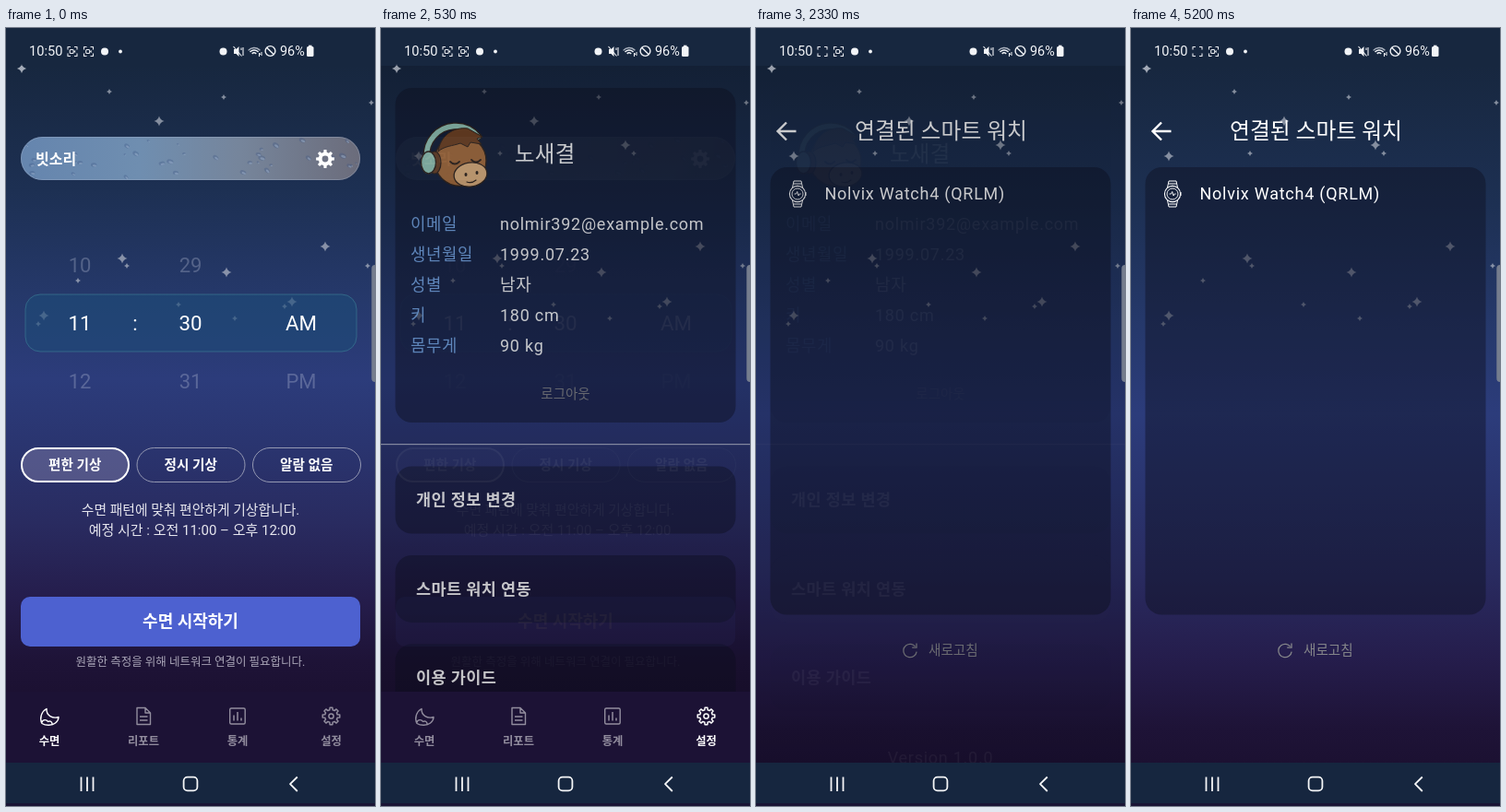
Recreate the animation shown at these times as an HTML page with a canvas. Size 400 by 844 pixels, loop 5540 ms.

```html
<!DOCTYPE html>
<html lang="ko">
<head>
<meta charset="utf-8">
<title>수면</title>
<style>
html, body { margin: 0; width: 100%; height: 100%; overflow: hidden; background: #000; }
canvas { display: block; width: 100vw; height: 100vh; }
</style>
</head>
<body>
<canvas id="stage"></canvas>
<script>
const W = 400, H = 844, LOOP = 5540;
const TOP = 41, BAR = 720, NAV = 797;
const HOME_OUT = 190, TAP = 2000, WATCH_IN = 1975, FADE = 700;
const FONT = 'Roboto, "Noto Sans CJK KR", "Noto Sans CJK JP", sans-serif';
const CARD = 'rgba(15,16,34,.46)';
const scale = window.devicePixelRatio || 1;

const stage = document.getElementById('stage');
stage.width = W * scale;
stage.height = H * scale;
const main = stage.getContext('2d');
main.scale(scale, scale);
let c = main;

// ---------- drawing helpers ----------
function text(s, x, y, size, color = '#fff', { weight = 400, align = 'left', gap = 0 } = {}) {
  c.font = `${weight} ${size}px ${FONT}`;
  c.textAlign = align;
  c.letterSpacing = gap + 'px';
  c.fillStyle = color;
  c.fillText(s, x, y + size * 0.36);
}
const centered = (s, x, y, size, color, weight) => text(s, x, y, size, color, { weight, align: 'center' });

function box(x, y, w, h, r, fill, stroke, line = 1) {
  c.beginPath();
  c.roundRect(x, y, w, h, r);
  paint(fill, stroke, line);
}
const card = (y, h) => box(15.5, y, 369, h, 18, CARD);
function oval(x, y, rx, ry, fill, stroke, line = 1, turn = 0) {
  c.beginPath();
  c.ellipse(x, y, rx, ry, turn, 0, 7);
  paint(fill, stroke, line);
}
function shape(d, fill, stroke, line = 1) {
  const p = new Path2D(d);
  if (fill) { c.fillStyle = fill; c.fill(p); }
  if (stroke) { c.strokeStyle = stroke; c.lineWidth = line; c.stroke(p); }
}
function paint(fill, stroke, line) {
  if (fill) { c.fillStyle = fill; c.fill(); }
  if (stroke) { c.strokeStyle = stroke; c.lineWidth = line; c.stroke(); }
}
function gradient(x0, y0, x1, y1, stops) {
  const g = c.createLinearGradient(x0, y0, x1, y1);
  stops.forEach(([at, color]) => g.addColorStop(at, color));
  return g;
}
function gearPath(x, y, r, teeth) {
  const step = Math.PI * 2 / teeth;
  c.beginPath();
  for (let i = 0; i < teeth; i++) {
    const a = i * step - Math.PI / 2;
    [[-0.3, 0.74], [-0.19, 1], [0.19, 1], [0.3, 0.74]].forEach(([k, m]) =>
      c.lineTo(x + Math.cos(a + k * step) * r * m, y + Math.sin(a + k * step) * r * m));
  }
  c.closePath();
}
function random(seed) {
  return () => (seed = (seed * 16807) % 2147483647) / 2147483647;
}

// ---------- shared backdrop ----------
const STARS = [
  [17, 44, 5], [112, 69, 3], [236, 75, 3], [166, 101, 5.5], [396, 81, 3], [41, 139, 5.5],
  [129, 136, 3], [265, 127, 5.5], [274, 136, 3], [126, 250, 5.5], [131, 258, 3], [346, 237, 5.5],
  [239, 265, 5.5], [78, 274, 3], [187, 300, 3], [310, 297, 5.5], [302, 302, 3], [41, 312, 5.5],
  [35, 321, 3], [248, 315, 3], [392, 258, 3]
];
// the gradient fills the space above the tab bar, or above the system bar
function backdrop(bottom) {
  c.fillStyle = gradient(0, TOP, 0, bottom, [
    [0, '#17273f'], [0.2, '#1d3053'], [0.38, '#26396c'], [0.5, '#2c3c7b'],
    [0.6, '#2a3570'], [0.73, '#292b60'], [0.85, '#251d4c'], [0.95, '#1e1337'], [1, '#1c1132']
  ]);
  c.fillRect(0, 0, W, bottom);
  c.fillStyle = 'rgba(190,194,205,.66)';
  STARS.forEach(([x, y, r]) => {
    c.beginPath();
    c.moveTo(x, y - r);
    [[1, 0], [0, 1], [-1, 0], [0, -1]].forEach(([i, j], n, all) => {
      const [pi, pj] = all[(n + 3) % 4], k = r * 0.2;
      c.quadraticCurveTo(x + (i + pi) * k, y + (j + pj) * k, x + i * r, y + j * r);
    });
    c.fill();
  });
}

// ---------- screens ----------
function rainPill() {
  c.save();
  c.beginPath();
  c.roundRect(16, 118, 368, 47, 23.5);
  c.clip();
  c.fillStyle = gradient(16, 0, 384, 0, [[0, '#6585ae'], [0.35, '#6f8eb0'], [0.65, '#76859b'], [1, '#6b6c7b']]);
  c.fillRect(16, 118, 368, 47);
  const rnd = random(77);
  for (let i = 0; i < 40; i++) {
    const x = 20 + rnd() * 360, y = 121 + rnd() * 42, r = 0.8 + rnd() * 2, turn = rnd() - 0.2;
    oval(x, y, r * 1.5, r, 'rgba(60,85,130,.32)', null, 1, turn);
    oval(x + 0.8, y + 0.9, r, r * 0.5, 'rgba(175,195,220,.4)', null, 1, turn);
  }
  c.restore();
  box(16.5, 118.5, 367, 46, 23, null, 'rgba(160,175,200,.4)');
  text('빗소리', 32, 142, 16, '#fff', { weight: 700 });
  gearPath(346, 142, 10, 8);
  c.moveTo(349.4, 142);
  c.arc(346, 142, 3.4, 0, 7);
  c.fillStyle = '#fff';
  c.fill('evenodd');
}

function home() {
  backdrop(BAR);
  rainPill();

  box(21, 289, 359, 62, 16, 'rgba(30,75,120,.62)', 'rgba(60,125,150,.65)');
  const dim = 'rgba(200,205,225,.3)';
  [['10', '11', '12', 80], ['29', '30', '31', 200], ['', 'AM', 'PM', 320]].forEach(([a, b, d, x]) => {
    centered(a, x, 257, 22, dim);
    centered(b, x, 320, 22.3, '#fff');
    centered(d, x, 383, 22, dim);
  });
  centered(':', 140, 320, 22.3, '#fff');

  ['편한 기상', '정시 기상', '알람 없음'].forEach((s, i) => {
    const x = 16 + i * 125.5;
    if (i) box(x + 0.5, 455.5, 117, 37, 18.5, null, '#9498b2');
    else box(x + 1, 456, 116, 36, 18, 'rgba(125,122,165,.5)', '#fff', 2);
    centered(s, x + 58.7, 474, 14.6, '#fff', 600);
  });

  centered('수면 패턴에 맞춰 편안하게 기상합니다.', 200, 523, 14.8, '#e6e6ee');
  centered('예정 시간 : 오전 11:00 – 오후 12:00', 202, 545, 15, '#e6e6ee');

  box(16, 617, 368, 54, 10, '#4d61d0');
  centered('수면 시작하기', 200, 644, 18, '#fff', 600);
  centered('원활한 측정을 위해 네트워크 연결이 필요합니다.', 200, 687, 12.5, '#aaa6b8');
}

function avatar() {
  const ink = '#33251c', teal = '#9bcfbd';
  c.lineCap = 'round';
  [[8, ink], [5.5, teal]].forEach(([w, color]) => {
    c.beginPath();
    c.arc(81, 138, 31.5, Math.PI * 0.98, Math.PI * 1.78);
    paint(null, color, w);
  });
  oval(86, 144, 28, 27.5, '#ad6f3c', ink, 1.4);
  shape('M62 134C64 117 78 107 94 109L110 118L104 120L109 126L97 124L94 129L86 125C78 128 68 128 62 134Z', '#764421', ink, 1);
  oval(97, 159, 18, 13, '#e8b780', ink, 1.3, -0.15);
  oval(92, 159, 1.5, 2, ink);
  oval(104, 157, 1.5, 2, ink);
  shape('M75 145q5 5 10 0M98 143q5 5 10 0', null, ink, 1.8);
  shape('M93 167q5 2 10 -2', null, ink, 1.2);
  oval(58, 146, 7, 12, '#704426', ink, 1.2);
  oval(51.5, 146, 8, 12, teal, ink, 1.4);
  c.lineCap = 'butt';
}

function settings(bottom) {
  backdrop(bottom);
  card(65, 363);
  avatar();
  text('노새결', 145, 137, 23.4, '#fff', { gap: 0.3 });
  [['이메일', 'nolmir392@example.com'], ['생년월일', '1999.07.23'], ['성별', '남자'],
   ['키', '180 cm'], ['몸무게', '90 kg']].forEach(([label, value], i) => {
    text(label, 32, 213 + i * 33, 17.8, '#78aaea', { gap: 0.6 });
    text(value, 129, 213 + i * 33, 18, '#fff', { gap: 0.75 });
  });
  centered('로그아웃', 200, 397, 14.5, '#838487');

  c.fillStyle = '#aab0c6';
  c.fillRect(0, 451, W, 1.2);

  ['개인 정보 변경', '스마트 워치 연동', '이용 가이드'].forEach((s, i) => {
    const y = 475.5 + i * 96.4;
    card(y, 73);
    text(s, 38, y + 36.5, 17.5, '#fff', { weight: 600, gap: 0.4 });
  });
  text('Version 1.0.0', 200, 792, 18, '#fff', { align: 'center', gap: 0.75 });
}

function watch() {
  backdrop(NAV);
  shape('M43.5 112H24M33 102.5L23.5 112L33 121.5', null, '#fff', 2.4);
  centered('연결된 스마트 워치', 200.5, 111, 23.8, '#fff', 500);
  card(151, 485.5);

  oval(45, 180, 8.6, 8.6, null, '#fff', 1.1);
  oval(45, 180, 6, 6, null, '#fff', 0.9);
  shape('M39.5 173L41 166H49L50.5 173M39.5 187L41 194H49L50.5 187M41 169H49M41 191H49M54 178v4', null, '#fff', 1);
  shape('M41.5 180h2l1.2 -2.5l1.4 4.5l1 -2h1.5', null, '#fff', 0.9);
  text('Nolvix Watch4 (QRLM)', 74.5, 180, 18, '#fff', { gap: 0.75 });

  const gray = '#85868a';
  c.beginPath();
  c.arc(167, 675.5, 7.2, 0.15, Math.PI * 1.78);
  paint(null, gray, 1.3);
  shape('M174 667.5V672.2H169.2', null, gray, 1.3);
  text('새로고침', 187, 675, 14.6, gray, { weight: 500 });
}

function layer(draw, ...args) {
  const cv = document.createElement('canvas');
  cv.width = W * scale;
  cv.height = H * scale;
  c = cv.getContext('2d');
  c.scale(scale, scale);
  draw(...args);
  c = main;
  return cv;
}

// ---------- system chrome ----------
function brackets(x, y, dot) {
  shape(`M${x - 5} ${y - 2}v-3h3M${x + 2} ${y - 5}h3v3M${x + 5} ${y + 2}v3h-3M${x - 2} ${y + 5}h-3v-3`, null, '#e8eaee', 1.1);
  if (dot <= 0) return;
  c.globalAlpha = dot;
  box(x - 2.8, y - 2, 4, 4, 1, null, '#e8eaee', 1.1);
  shape(`M${x + 1.2} ${y}l2 -1.6v3.2z`, '#e8eaee');
  c.globalAlpha = 1;
}

function statusBar(dot) {
  c.fillStyle = '#17273f';
  c.fillRect(0, 0, W, TOP);
  // the topmost star reaches under the status bar edge
  shape('M17 39Q17.8 43 22 44Q17.8 45 17 49Q16.2 45 12 44Q16.2 43 17 39Z', 'rgba(190,194,205,.55)');
  text('10:50', 25, 25, 14.6, '#f2f4f7');
  brackets(72, 25.5, dot);
  brackets(89.5, 25.5, 1);
  oval(107, 25.5, 4, 4, '#f2f4f7');
  oval(124, 25.5, 1.9, 1.9, '#f2f4f7');

  oval(235.5, 25.5, 4, 4, '#f2f4f7');
  shape('M247 23h2.5l3 -3v11l-3 -3h-2.5z', '#f2f4f7');
  shape('M246.5 20l9 10.5M255 21.5v2.5M257 21v9', null, '#f2f4f7', 1.1);
  [3, 6, 8.5].forEach(r => {
    c.beginPath();
    c.arc(269, 30, r, -Math.PI * 0.77, -Math.PI * 0.23);
    paint(null, r > 7 ? '#aab1bd' : '#f2f4f7', 1.4);
  });
  shape('M274.5 31v-4l1.5 2M277 26v4', null, '#f2f4f7', 1);
  oval(286.5, 25, 5.4, 5.4, null, '#f2f4f7', 1.4);
  shape('M282.7 21.2l7.6 7.6', null, '#f2f4f7', 1.4);
  text('96%', 297, 25, 14.4, '#f2f4f7');
  box(326, 20, 7.5, 11, 1.5, '#f2f4f7');
  c.fillRect(328, 18.7, 3.5, 2);
}

function systemNav() {
  c.fillStyle = '#16263f';
  c.fillRect(0, NAV, W, H - NAV);
  c.fillStyle = '#1a1435';
  c.fillRect(0, 841, W, 3);
  shape('M81.5 812.5v15.5M88 812.5v15.5M94.5 812.5v15.5', null, '#f4f5f7', 1.8);
  box(192.6, 812.6, 14.8, 14.8, 4.2, null, '#f4f5f7', 1.8);
  shape('M315.8 812.5L308 820.2L315.8 828', null, '#f4f5f7', 1.8);
}

const TABS = [
  ['수면', 47, () => shape('M44 738.5C38.5 741.5 36 748.5 39 754.5C43 757 50 757 53.5 754C56 752 57 749.5 57 747.5C50.5 749.5 43.5 746 44 738.5ZM38.5 754C40 749.5 44 750 45.5 752.5C48 751 50.5 753 50 756', null, '#fff', 1.4)],
  ['리포트', 149, () => shape('M142 737.5h9l5.5 5.5v12.5h-14.5zM151 737.5v5.5h5.5M145 747h8.5M145 751h8.5', null, '#fff', 1.4)],
  ['통계', 251, () => {
    box(242.7, 738, 16.5, 17, 1.5, null, '#fff', 1.4);
    shape('M247 745.5v6M251 742v9.5M255 748.5v3', null, '#fff', 1.5);
  }],
  ['설정', 352.5, () => {
    gearPath(352.5, 746.5, 9.4, 8);
    c.lineJoin = 'round';
    paint(null, '#fff', 1.5);
    oval(352.5, 746.5, 2.6, 2.6, null, '#fff', 1.5);
  }]
];

function tabBar(t) {
  c.fillStyle = '#1c1235';
  c.fillRect(0, BAR, W, NAV - BAR);
  const press = ramp(t, 70, 200) * (1 - ramp(t, 340, 500));
  if (press > 0) box(322, 731, 62, 31, 15.5, `rgba(55,75,125,${0.4 * press})`);
  const moved = ramp(t, 70, 170);
  TABS.forEach(([label, x, icon], i) => {
    const on = i === 0 ? 1 - moved : i === 3 ? moved : 0;
    c.globalAlpha = 0.52 + 0.48 * on;
    icon();
    centered(label, x, 774, 12.3, '#fff', 600);
  });
  c.globalAlpha = 1;
}

// ---------- time ----------
const ramp = (t, a, b) => Math.min(1, Math.max(0, (t - a) / (b - a)));

// cubic-bezier(.4, 0, .2, 1)
function ease(x) {
  let lo = 0, hi = 1;
  for (let i = 0; i < 20; i++) {
    const s = (lo + hi) / 2, r = 1 - s;
    if (1.2 * r * r * s + 0.6 * r * s * s + s ** 3 < x) lo = s; else hi = s;
  }
  return 3 * (1 - lo) * lo * lo + lo ** 3;
}
const fade = (t, from) => ease(ramp(t, from, from + FADE));

function crossfade(from, to, k) {
  [[from, 1 - k], [to, k]].forEach(([img, alpha]) => {
    c.globalAlpha = alpha;
    c.drawImage(img, 0, 0, W, H);
  });
  c.globalAlpha = 1;
}

function touchRipple(t, k) {
  const alpha = 0.075 * (1 - k) ** 2, r = 116 + (t - TAP) * 0.5;
  if (alpha < 0.002) return;
  c.save();
  c.beginPath();
  c.roundRect(15.5, 572, 369, 73, 18);
  c.clip();
  oval(154, 612, r, r, `rgba(215,215,205,${alpha})`);
  c.restore();
}

const screens = {
  home: layer(home),
  settings: layer(settings, BAR),
  settingsTall: layer(settings, NAV),
  watch: layer(watch)
};

function draw(t) {
  c.fillStyle = '#04050c';
  c.fillRect(0, 0, W, H);
  if (t < TAP) {
    crossfade(screens.home, screens.settings, fade(t, HOME_OUT));
    tabBar(t);
  } else {
    const k = fade(t, WATCH_IN);
    crossfade(screens.settingsTall, screens.watch, k);
    touchRipple(t, k);
  }
  const beat = (t + 930) % 1000;
  statusBar(beat >= 460 ? 1 : 1 - ramp(beat, -60, 130));
  systemNav();
  box(396.3, 257, 10, 127, 4, '#757d8e');
}

const start = performance.now();
function tick() {
  draw((performance.now() - start) % LOOP);
  requestAnimationFrame(tick);
}
tick();
</script>
</body>
</html>
```
